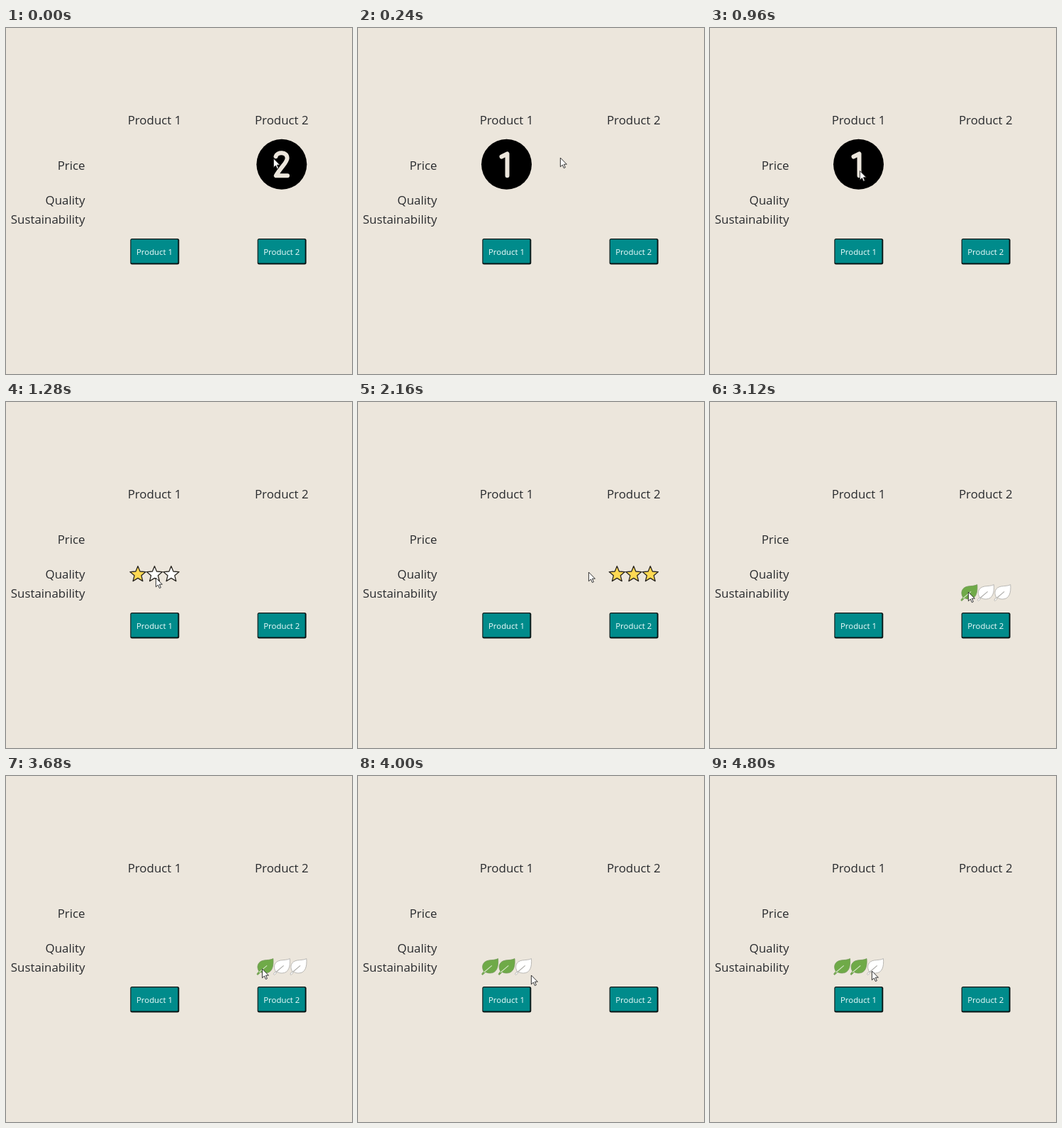
Animation of 488 by 488 pixels, one loop 4880 ms. Source, as an HTML page:

```html
<!DOCTYPE html>
<html lang="en">
<head>
<meta charset="utf-8">
<title>Product comparison</title>
<style>
  html, body { margin: 0; width: 100%; height: 100%; overflow: hidden; background: #ece6dc; }
  svg { display: block; width: 100vw; height: 100vh; }
  text { font-family: "Open Sans", "Noto Sans", sans-serif; font-size: 16.9px; fill: #292b2e; }
  .mid { text-anchor: middle; }
  .end { text-anchor: end; }
  .button { font-size: 11.4px; font-weight: 500; fill: #f4ffff; }
  .digit { fill: none; stroke: #ece6dc; stroke-width: 6; stroke-linecap: round; stroke-linejoin: round; }
</style>
</head>
<body>
<svg id="stage" viewBox="0 0 488 488"></svg>
<script>
const LOOP = 4880, STEP = 80;
const COLUMN_SPLIT = 300, QUALITY_TOP = 231, LEAF_TOP = 257;
const columns = [209.5, 388.8];
const ratings = { quality: [1, 3], leaf: [2, 1] };

// Pointer stops: time, x, y
const stops = [
  [0, 377, 184], [80, 377, 184], [240, 285, 183], [320, 238, 187],
  [400, 218, 189], [560, 211, 190], [880, 211, 190], [1280, 211, 248],
  [1840, 212, 249], [2080, 275, 244], [2160, 325, 240], [2320, 375, 242],
  [2640, 386, 246], [2800, 384, 247], [3120, 364, 268], [3680, 361, 272],
  [4000, 244, 281], [4320, 227, 278], [4800, 228, 275]
];

const label = (x, y, cls, text) => `<text class="${cls}" x="${x}" y="${y}">${text}</text>`;

function starPath(cx, cy, outer, inner) {
  const points = Array.from({ length: 10 }, (_, i) => {
    const r = i % 2 ? inner : outer, a = i * Math.PI / 5 - Math.PI / 2;
    return `${(cx + r * Math.cos(a)).toFixed(2)} ${(cy + r * Math.sin(a)).toFixed(2)}`;
  });
  return `M${points.join("L")}Z`;
}

function star(x, on) {
  return `<path d="${starPath(x, 243.2, 11.7, 5.2)}" fill="${on ? "#ffd953" : "#fff"}"
    stroke="#29251f" stroke-width="1.3" stroke-linejoin="round"/>`;
}

function leaf(x, on) {
  return `<g transform="translate(${x - 12} 257)">
    <path d="M23.5 .6C24.4 11.5 22 21 12.5 21C9.5 21 7.4 20.4 6 19.4L1.8 23.6L.5 22.4L3.4 18.4
      C-.4 12 1.8 4.4 10.5 3C15.5 2.3 20 2.6 23.5 .6Z" fill="${on ? "#6faa48" : "#fff"}"
      stroke="${on ? "#74985a" : "#aaa9a5"}" stroke-width=".8" stroke-linejoin="round"/>
    <path d="M3.5 20L14.8 10.4" stroke="${on ? "#d7e6c9" : "#aaa9a5"}" stroke-width="1.1" fill="none"/>
  </g>`;
}

const row = (draw, cx, count) =>
  [0, 1, 2].map(i => draw(cx + (i - 1) * 23.5, i < count)).join("");

const digits = [
  "M-7-10.8L1-15V16",
  "M-8.3-11C-6.6-18.2 8-18.2 7.8-8.6C7.6-2.4-1.5 4.5-8 16H8.2"
];

function price(col) {
  return `<g transform="translate(${columns[col]} 192.3)">
    <circle r="35.5" fill="#000"/><path class="digit" d="${digits[col]}"/></g>`;
}

function button(cx, text) {
  const x = cx - 34.2;
  return `<rect x="${x}" y="297" width="69" height="36.4" rx="2.5" fill="#071414"/>
    <rect x="${x + 1.1}" y="298.2" width="66" height="33.3" rx="1.2" fill="#008b8b"/>
    ${label(cx, 319.5, "button mid", text)}`;
}

const cell = (name, col, content) => `<g id="${name}${col}" visibility="hidden">${content}</g>`;

document.getElementById("stage").innerHTML =
  label(111.5, 200, "end", "Price") +
  label(111.5, 249.2, "end", "Quality") +
  label(111.5, 276.2, "end", "Sustainability") +
  columns.map((cx, col) =>
    label(cx, 136, "mid", `Product ${col + 1}`) +
    button(cx, `Product ${col + 1}`) +
    cell("price", col, price(col)) +
    cell("quality", col, row(star, cx, ratings.quality[col])) +
    cell("leaf", col, row(leaf, cx, ratings.leaf[col]))
  ).join("") +
  `<path id="pointer" d="M.4 0V12.8L3.4 10L5.4 14.6L7.4 13.7L5.4 9.2H9.4Z" fill="#fff"
    stroke="#202020" stroke-width=".9" stroke-linejoin="round"/>`;

const pointer = document.getElementById("pointer");
const cells = [...document.querySelectorAll("g[id]")];

function pointerAt(t) {
  const next = stops.findIndex(s => s[0] > t);
  if (next < 0) return stops[stops.length - 1].slice(1);
  const [t0, x0, y0] = stops[next - 1], [t1, x1, y1] = stops[next];
  const k = (t - t0) / (t1 - t0);
  return [x0 + (x1 - x0) * k, y0 + (y1 - y0) * k];
}

function render(time) {
  const [x, y] = pointerAt(Math.floor(time % LOOP / STEP) * STEP);
  const name = y < QUALITY_TOP ? "price" : y < LEAF_TOP ? "quality" : "leaf";
  const active = name + (x < COLUMN_SPLIT ? 0 : 1);
  cells.forEach(c => c.setAttribute("visibility", c.id === active ? "visible" : "hidden"));
  pointer.setAttribute("transform", `translate(${x} ${y})`);
}

const start = performance.now();
function tick() {
  render(performance.now() - start);
  requestAnimationFrame(tick);
}
tick();
</script>
</body>
</html>
```
